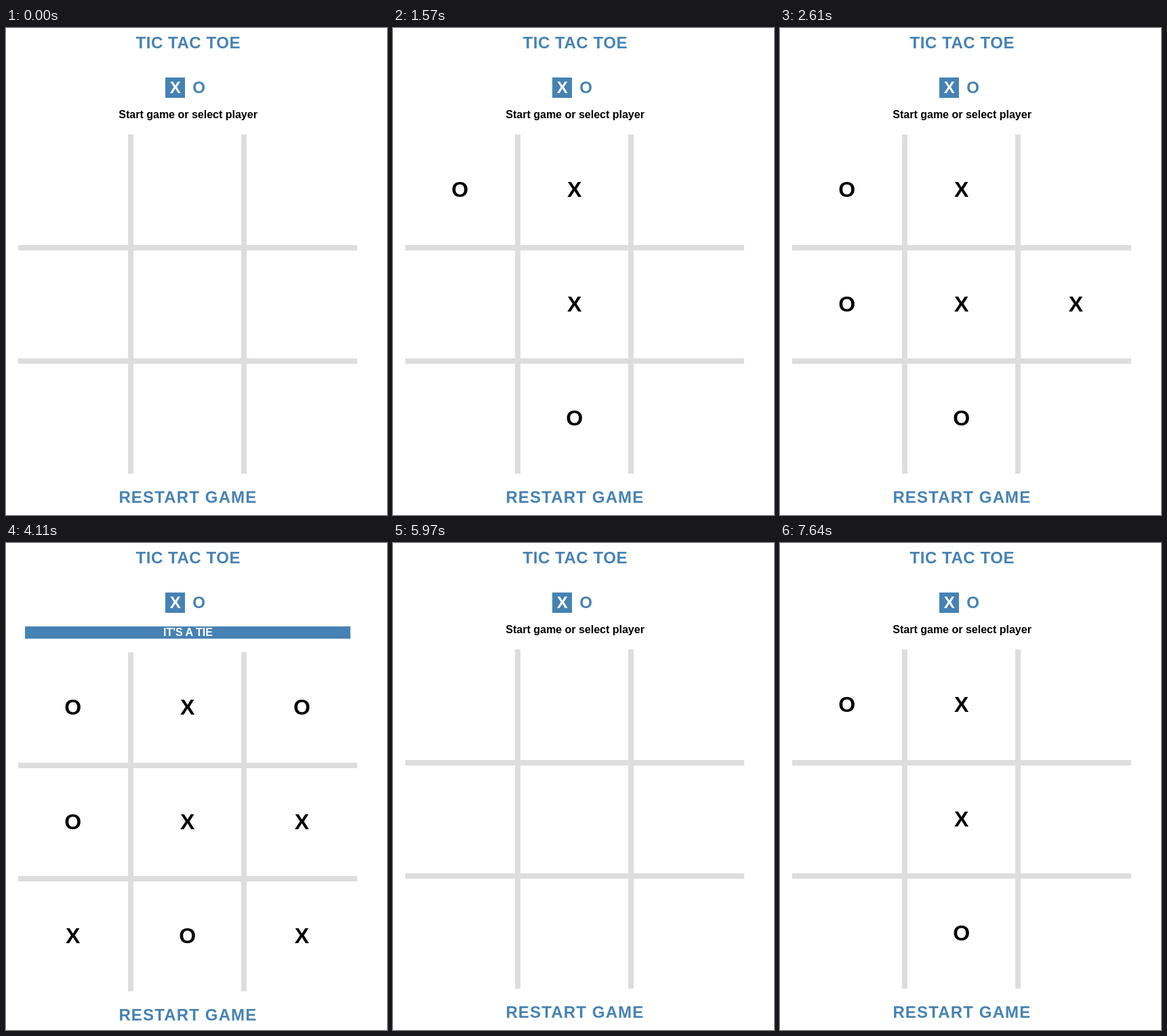
Recreate the animation shown at these times as an HTML page. Size 562x718 px, loop 8 s.

```html
<!DOCTYPE html>
<html lang="en">
<head>
<meta charset="utf-8">
<title>Tic Tac Toe</title>
<style>
  html, body { margin: 0; width: 100%; height: 100%; overflow: hidden; background: #fff; }
  svg { display: block; font: bold 16px "Liberation Sans", Arial, sans-serif; }
  .blue { fill: #4682b4; }
  .big { font-size: 24px; }
  .mid { text-anchor: middle; }
  #marks { font-size: 32px; }
</style>
</head>
<body>
<svg width="562" height="718" viewBox="0 0 562 718">
  <text class="blue big" x="191.5" y="30" letter-spacing=".55">TIC TAC TOE</text>
  <rect class="blue" x="235" y="73" width="29" height="30"/>
  <text class="big mid" x="249.7" y="96" fill="#fff">X</text>
  <text class="blue big mid" x="284.5" y="96">O</text>
  <text id="prompt" class="mid" x="268.6" y="133">Start game or select player</text>
  <g id="tie">
    <rect class="blue" x="28" y="123" width="480" height="18"/>
    <text class="mid" x="268.4" y="137" fill="#fff">IT'S A TIE</text>
  </g>
  <g id="board">
    <path fill="#ddd" d="M180 157h8v500h-8zM347 157h8v500h-8zM18 320h500v8h-500zM18 487h500v8h-500z"/>
    <g id="marks" class="mid"></g>
    <text class="blue big" x="166.4" y="700" letter-spacing="1.15">RESTART GAME</text>
  </g>
</svg>
<script>
const LOOP = 8000;
const columns = [98.6, 267.6, 436.5];
const baselines = [249, 418, 586];

// Start time and the nine cells, row by row
const steps = [
  [0,    '         '],
  [730,  'OX       '],
  [1570, 'OX  X  O '],
  [2610, 'OX OXX O '],
  [3370, 'OXOOXXXO '],
  [4110, 'OXOOXXXOX'],
  [5970, '         '],
  [6760, 'O   X    '],
  [7640, 'OX  X  O ']
];

const byId = id => document.getElementById(id);
const cells = Array.from({ length: 9 }, (_, i) => {
  const cell = document.createElementNS('http://www.w3.org/2000/svg', 'text');
  cell.setAttribute('x', columns[i % 3]);
  cell.setAttribute('y', baselines[Math.floor(i / 3)]);
  return byId('marks').appendChild(cell);
});

let shown;
function show(state) {
  if (state === shown) return;
  shown = state;
  const full = !state.includes(' ');
  cells.forEach((cell, i) => cell.textContent = state[i].trim());
  byId('prompt').style.display = full ? 'none' : '';
  byId('tie').style.display = full ? '' : 'none';
  // The result banner pushes the board down
  byId('board').setAttribute('transform', `translate(0 ${full ? 4 : 0})`);
}

function frame() {
  const t = performance.now() % LOOP;
  show(steps.filter(([start]) => start <= t).pop()[1]);
  requestAnimationFrame(frame);
}
frame();
</script>
</body>
</html>
```
